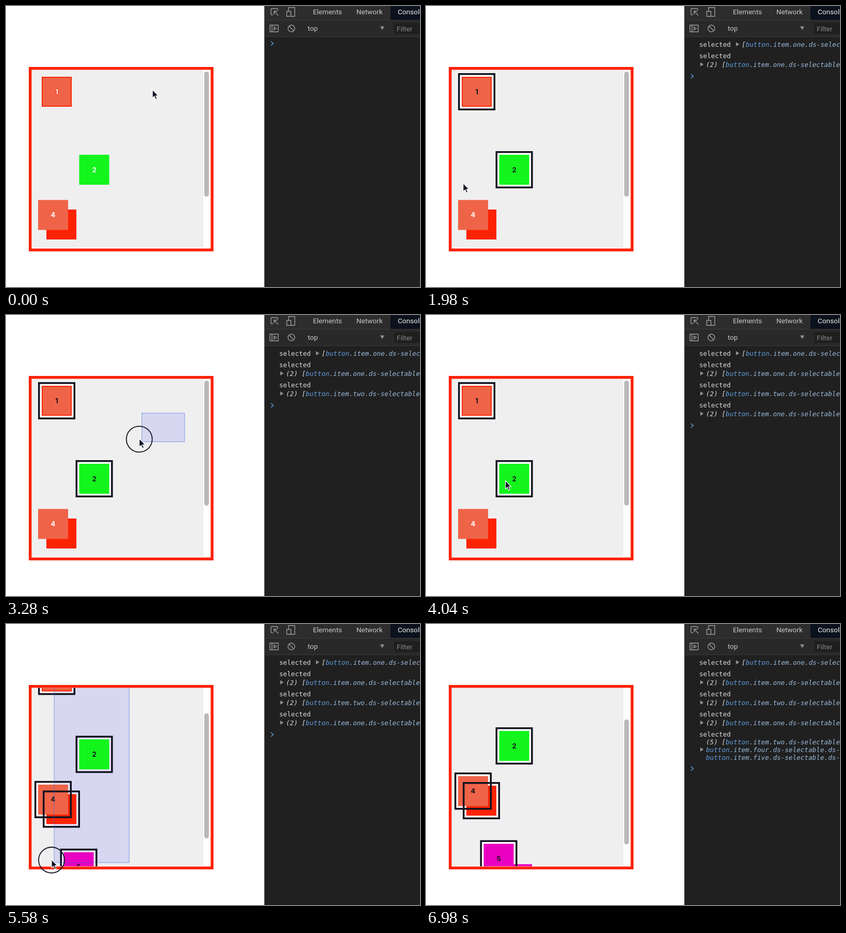
Write an HTML page that moves like this. It is 800 px wide and 544 px high and loops after 7 s.

```html
<!DOCTYPE html>
<html lang="en">
<head>
<meta charset="utf-8">
<title>Drag selection with console</title>
<style>
  html, body { margin: 0; width: 100%; height: 100%; overflow: hidden; background: #fff; }
  svg { display: block; width: 800px; height: 544px; }
  .num { font: 700 13px Inter, "Open Sans", sans-serif; text-anchor: middle; fill: #fff; }
  .on .num { fill: #10131f; }
  .halo { stroke: #fc2304; stroke-width: 1.6px; paint-order: stroke; }
  .on .halo { stroke: none; }
  .ui { font: 13.6px Roboto, "Liberation Sans", sans-serif; fill: #c6c8ca; }
  .log { font: 12.65px "DejaVu Sans Mono", monospace; fill: #dcdcdc; white-space: pre; }
  .list { font-style: italic; }
  .tag { fill: #5f9fe0; }
  .cls { fill: #9bbbdc; }
  .icon { fill: none; stroke: #9a9da0; stroke-width: 1.4; }
</style>
</head>
<body>
<svg viewBox="0 0 800 544">
  <defs>
    <clipPath id="view"><rect x="49.5" y="123.5" width="346" height="345.5"/></clipPath>
  </defs>

  <rect x="50" y="124" width="330" height="343.5" fill="#efefef"/>
  <path d="M380.5 124V468" stroke="#e6e6e6"/>
  <g clip-path="url(#view)">
    <g class="scroll" id="gaps"></g>
    <rect class="area" fill="rgba(0,0,255,.1)"/>
    <g class="scroll" id="items"></g>
    <g class="scroll" id="rings"></g>
    <rect class="area" fill="none" stroke="rgba(50,100,215,.6)"/>
  </g>
  <rect id="thumb" x="383" y="127" width="9" height="242" rx="4.5" fill="#b9b9b9"/>
  <rect x="46.75" y="120.75" width="351.5" height="351.5" fill="none" stroke="#fc2304" stroke-width="5.5"/>

  <g id="tools">
    <rect x="500" width="300" height="544" fill="#202020"/>
    <rect x="500" width="300" height="27" fill="#2d2d2d"/>
    <rect x="500" y="27" width="300" height="32" fill="#292929"/>
    <path d="M500 27.5H800M500 59.5H800" stroke="#3a3a3a"/>
    <path d="M499.5 0V544" stroke="#4a4a4a"/>
    <rect x="743" width="57" height="27" fill="#0b111d"/>
    <rect x="750" y="33" width="50" height="21" fill="#1f1f1f"/>
    <g class="icon">
      <path d="M516 17H514Q512 17 512 15V7Q512 5 514 5H523Q525 5 525 7V9"/>
      <path d="M518 10L525 17M518 16V10H524M525 17L526 18.5"/>
      <path d="M546 10V3H558V20H551M542.5 10.500H550.5V20H542.5Z"/>
      <path d="M510 37H526V50H510ZM514 37V50M518 40.500L522.5 43.500L518 46.500Z"/>
      <circle cx="551.5" cy="43.500" r="6.500"/><path d="M547 39L556 48"/>
    </g>
    <path d="M723 39.500H731L727 46.500Z" fill="#8d9093"/>
    <text class="ui" x="593" y="16">Elements</text>
    <text class="ui" x="677" y="16">Network</text>
    <text class="ui" x="757" y="16" style="fill:#f2f2f2">Console</text>
    <text class="ui" x="583" y="47.500">top</text>
    <text class="ui" x="755" y="48.500" style="fill:#85888b">Filter</text>
    <g id="logs"></g>
    <path id="prompt" d="M512 68.500L516.5 72.500L512 76.500" fill="none" stroke="#5b9ad2" stroke-width="1.6"/>
  </g>

  <g id="pointer">
    <circle id="press" r="25" cy="1" fill="none" stroke="#10131f" stroke-width="1.800"/>
    <path d="M0 0V16.200L3.700 12.800L6.300 18.800L9 17.600L6.400 11.800H11.400Z"
      fill="#0d1020" stroke="#fff" stroke-width="1.200" stroke-linejoin="round"/>
  </g>
</svg>
<script>
const LOOP = 7000;
const NS = "http://www.w3.org/2000/svg";
const $ = id => document.getElementById(id);

function add(parent, tag, attrs, text) {
  const el = document.createElementNS(NS, tag);
  for (const k in attrs) el.setAttribute(k, attrs[k]);
  if (text) el.textContent = text;
  return parent.appendChild(el);
}
const set = (el, attrs) => { for (const k in attrs) el.setAttribute(k, attrs[k]); };
const show = (el, on) => el.setAttribute("visibility", on ? "visible" : "hidden");

// Squares: position, colour, label, time of selection
const items = [
  { x: 69, y: 137, fill: "#ef6448", label: 1, at: 460 },
  { x: 141.5, y: 288, fill: "#13f51c", label: 2, at: 940 },
  { x: 78, y: 394, fill: "#fc2304", label: "", at: 4800 },
  { x: 62, y: 375.5, fill: "#ef6448", label: 4, at: 4810 },
  { x: 147, y: 546, fill: "#ea00c0", label: "", at: Infinity },
  { x: 111.500, y: 506.500, fill: "#ea00c0", label: 5, at: 5420 }
];
const SIZE = 58;
for (const it of items) {
  const { x, y } = it;
  const ring = (d, extra) => ({ x: x - d, y: y - d, width: SIZE + 2 * d, height: SIZE + 2 * d, ...extra });
  it.gap = add($("gaps"), "rect", ring(4, { fill: "#fff" }));
  it.box = add($("items"), "g", {});
  add(it.box, "rect", ring(0, { fill: it.fill }));
  if (it.label === 1) add(it.box, "rect", ring(-1, { fill: "none", stroke: "#f92a08", "stroke-width": 2 }));
  if (it.label === 2) it.focus = add(it.box, "rect", ring(-.7, { fill: "none", stroke: "#10331f", "stroke-width": 1.4 }));
  add(it.box, "text", { class: it.label === 1 ? "num halo" : "num", x: x + SIZE / 2, y: y + 33.500 }, String(it.label));
  it.ring = add($("rings"), "rect", ring(5.250, { fill: "none", stroke: "#10131f", "stroke-width": 3.500 }));
}

// Console entries: time, prompt position afterwards, and rows
const logs = [
  { at: 560, prompt: 96, y: 74, arrow: [602, 74], rows: [[610, 74, "[", "one"]] },
  { at: 1020, prompt: 135.500, y: 96, arrow: [533, 113], rows: [[541, 113, "(2) [", "one"]] },
  { at: 2860, prompt: 174.500, y: 135, arrow: [533, 152], rows: [[541, 152, "(2) [", "two"]] },
  { at: 3890, prompt: 213.500, y: 174, arrow: [533, 191], rows: [[541, 191, "(2) [", "one"]] },
  { at: 5970, prompt: 279.500, y: 213, arrow: [533, 243],
    rows: [[541, 228, "(5) [", "two"], [541, 243, "", "four"], [541, 258, "", "five"]] }
];
for (const log of logs) {
  log.el = add($("logs"), "g", {});
  add(log.el, "text", { class: "log", x: 528, y: log.y + 4.500 }, "selected");
  const [ax, ay] = log.arrow;
  add(log.el, "path", { d: `M${ax - 3} ${ay - 4}l6.500 4l-6.500 4z`, fill: "#8d9093" });
  for (const [x, y, lead, name] of log.rows) {
    const row = add(log.el, "text", { class: "log list", x, y: y + 4.500 });
    add(row, "tspan", {}, lead);
    add(row, "tspan", { class: "tag" }, "button");
    add(row, "tspan", { class: "cls" }, `.item.${name}.ds-selectable.ds-selected`);
  }
}

// Pointer path: time, x, y
const path = [
  [0, 283, 162], [420, 103, 170], [560, 103, 170], [720, 150, 295],
  [880, 172, 318], [1000, 172, 318], [1240, 197, 265], [1440, 88, 290],
  [1760, 80, 346], [2160, 68, 338], [2500, 91, 315], [2600, 89, 330],
  [2850, 112, 180], [3080, 340, 184], [3130, 340, 184], [3280, 258, 239],
  [3600, 134, 349], [3780, 128, 373], [3900, 128, 373], [4340, 233, 157],
  [4440, 233, 157], [4880, 86, 417], [5040, 87, 455], [5580, 88, 456],
  [5760, 62, 462], [5940, 70, 455], [6480, 220, 240], [7000, 220, 240]
];
const HIDE = 6520;
const clicks = [[430, 560], [900, 1010]];
const drags = [[2600, 2850], [3100, 3880], [4400, 5960]];
const within = t => ([a, b]) => t >= a && t < b;

// Smooth curve through the keys that never overshoots them
function track(t, axis) {
  let i = 0;
  while (i < path.length - 2 && t >= path[i + 1][0]) i++;
  const rate = k => k < 0 || k > path.length - 2 ? 0
    : (path[k + 1][axis] - path[k][axis]) / (path[k + 1][0] - path[k][0]);
  const slope = k => {
    const a = rate(k - 1), b = rate(k);
    return a * b <= 0 ? 0 : 2 * a * b / (a + b);
  };
  const span = path[i + 1][0] - path[i][0];
  const u = (t - path[i][0]) / span, v = 1 - u;
  return v * v * (1 + 2 * u) * path[i][axis] + u * u * (3 - 2 * u) * path[i + 1][axis]
    + u * v * span * (v * slope(i) - u * slope(i + 1));
}

const scrollAt = t => Math.min(81, Math.max(0, (t - 5050) * 64.500 / 530));
const scrollers = document.querySelectorAll(".scroll");
const areas = document.querySelectorAll(".area");

function drawArea(t, scroll) {
  const drag = drags.find(within(t));
  areas.forEach(el => show(el, drag));
  if (!drag) return;
  const corner = (time, dy) => [track(time, 1) + 5, track(time, 2) + 6 - dy];
  const [x0, y0] = corner(drag[0], scroll);
  const [x1, y1] = corner(t, 0);
  areas.forEach(el => set(el, {
    x: Math.min(x0, x1), y: Math.min(y0, y1),
    width: Math.abs(x1 - x0), height: Math.abs(y1 - y0)
  }));
}

function draw(t) {
  const scroll = scrollAt(t);
  scrollers.forEach(g => set(g, { transform: `translate(0 ${-scroll})` }));
  set($("thumb"), { y: 127 + scroll * .712 });

  for (const it of items) {
    const on = t >= it.at;
    it.box.setAttribute("class", on ? "on" : "");
    show(it.gap, on);
    show(it.ring, on);
    if (it.focus) show(it.focus, t >= 900 && t < 1500);
  }

  let prompt = 72;
  for (const log of logs) {
    show(log.el, t >= log.at);
    if (t >= log.at) prompt = log.prompt;
  }
  set($("prompt"), { transform: `translate(0 ${prompt - 72})` });

  drawArea(t, scroll);
  $("pointer").style.display = t < HIDE ? "" : "none";
  set($("pointer"), { transform: `translate(${track(t, 1)} ${track(t, 2)})` });
  show($("press"), clicks.concat(drags).some(within(t)));
}

const start = performance.now();
function tick() {
  draw((performance.now() - start) % LOOP);
  requestAnimationFrame(tick);
}
draw(0);
requestAnimationFrame(tick);
</script>
</body>
</html>
```
